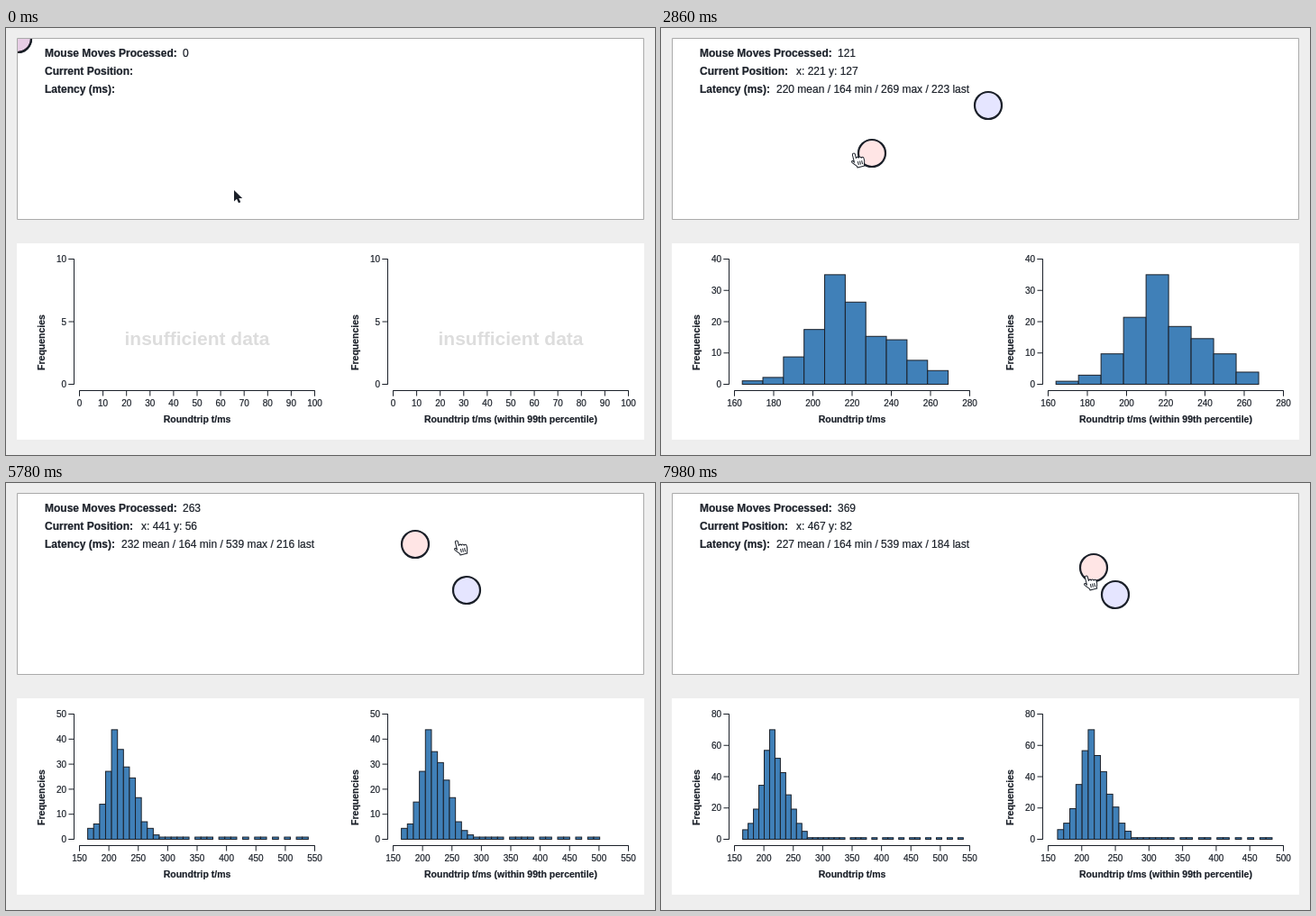
Animation, 720 px wide and 474 px high, one loop 8000 ms. Source, as an HTML page:

```html
<!DOCTYPE html>
<html lang="en">
<head>
<meta charset="utf-8">
<title>Mouse latency</title>
<style>
  html, body { margin: 0; width: 100%; height: 100%; overflow: hidden; background: #eee; }
  svg { display: block; width: 720px; height: 474px; font-family: "Liberation Sans", Arial, sans-serif; font-size: 12px; fill: #1b2029; }
  text { stroke: #1b2029; stroke-width: .2; }
  .axis { fill: none; stroke: #1b2029; }
  .tick { font-size: 10px; }
  .name { font-size: 10.5px; font-weight: bold; text-anchor: middle; }
  .none { font-size: 21px; font-weight: bold; text-anchor: middle; fill: #ddd; stroke: none; }
  .bar { fill: #4080b8; stroke: #1b2029; }
  .dot { stroke: #1b2029; stroke-width: 2.2; }
</style>
</head>
<body>
<svg viewBox="0 0 720 474">
  <defs><clipPath id="pad"><path d="M13 12H707V212H13Z"/></clipPath></defs>
  <path d="M12.5 11.5H707.5V212.5H12.5Z" fill="#fff" stroke="#aaa"/>
  <path d="M12 239H708V457H12Z" fill="#fff"/>
  <g font-weight="bold">
    <text x="43" y="32">Mouse Moves Processed:</text>
    <text x="43" y="52">Current Position:</text>
    <text x="43" y="72">Latency (ms):</text>
  </g>
  <text id="moves" x="196" y="32"></text>
  <text id="pos" x="150" y="52"></text>
  <text id="lat" x="128" y="72"></text>
  <g clip-path="url(#pad)">
    <circle id="blue" class="dot" r="15" fill="rgba(0,0,255,.1)"/>
    <circle id="red" class="dot" r="15" fill="rgba(255,0,0,.1)"/>
  </g>
  <g id="charts"></g>
  <g id="arrow"><path d="M0 0V12.5L3 9.8L5 14.3L7.3 13.3L5.3 9H9.2Z" stroke="#fff" stroke-width="1.6" paint-order="stroke"/></g>
  <g id="hand"><g transform="rotate(-14)" stroke="#1b2029" stroke-linejoin="round">
    <path fill="#fff" d="M-2 10V1.5Q-2 0-.5 0T1 1.5V6Q1.3 4.8 2.5 4.9T3.8 6.3Q4.3 5.3 5.4 5.5T6.6 7Q7.2 6.2 8.3 6.5T9.3 8V11Q9 13 8 14.5V16.5H0V15L-4.5 9.5Q-5 8-3.8 7.8T-2 10Z"/>
    <path d="M2 10v4M4.2 10v4M6.4 10v4"/>
  </g></g>
</svg>
<script>
const LOOP = 8000, STEP = 20, START = 120;
const FIRST = 368, RATE = .0486;
const RED_LAG = 200, BLUE_LAG = 420;
const $ = id => document.getElementById(id);
const clamp = (v, a, b) => Math.min(b, Math.max(a, v));
const mix = (a, b, u) => a + (b - a) * u;

// Pointer sweeps: end time, then where it is two lags before, one lag before, and at the end
const sweeps = [
  [1400, [319, 124], [306, 109], [287, 120]],
  [2860, [363, 86], [234, 139], [214, 139]],
  [4000, [429, 106], [405, 108], [458, 101]],
  [5780, [511, 119], [454, 68], [500, 64]],
  [7160, [423, 155], [284, 166], [235, 168]],
  [7980, [504, 124], [480, 94], [472, 103]]
];
const path = [{ t: START, at: [253, 180] }].concat(sweeps.flatMap(([t, a, b, c]) => [
  { t: t - BLUE_LAG, at: a }, { t: t - RED_LAG, at: b }, { t, at: c }
]));

// Velocity at a key point, led by the shorter neighbouring stretch
function slope(j, c) {
  const p = path[j - 1], q = path[j], r = path[j + 1];
  if (!p || !r) return 0;
  const h = q.t - p.t, k = r.t - q.t;
  return ((q.at[c] - p.at[c]) / h * k + (r.at[c] - q.at[c]) / k * h) / (h + k);
}

function pointer(t) {
  let i = 0;
  while (i < path.length - 2 && t >= path[i + 1].t) i++;
  const a = path[i], b = path[i + 1], h = b.t - a.t;
  const u = clamp((t - a.t) / h, 0, 1), w = 1 - u;
  return [0, 1].map(c =>
    w * w * (1 + 2 * u) * a.at[c] + u * u * (3 - 2 * u) * b.at[c] +
    h * u * w * (w * slope(i, c) - u * slope(i + 1, c)));
}

// Phases of the connection: last move, centre, spread, tail power
const phases = [[55, 228, 14.3, .8], [121, 213, 7.7, 1.25], [243, 220, 17, .8], [Infinity, 214, 11, 1]];
const STALL = 213, QUEUE = 20;

function latency(i) {
  const late = i - STALL;
  if (late >= 0 && late < QUEUE) return 539 - 19.5 * late + .3 * late * late;
  const [, mid, spread, power] = phases.find(p => i <= p[0]);
  const u = mix(.007, .993, i * .618034 % 1);
  const z = Math.log(u / (1 - u));
  return clamp(mid + spread * Math.sign(z) * Math.abs(z) ** power, 164, 269);
}
const latencies = Array.from({ length: 400 }, (_, i) => latency(i + 1));

function niceScale(lo, hi, count) {
  const span = hi - lo;
  let step = 10 ** Math.floor(Math.log10(span / count));
  const err = count / span * step;
  step *= err <= .15 ? 10 : err <= .35 ? 5 : err <= .75 ? 2 : 1;
  return { lo: Math.floor(lo / step) * step, hi: Math.ceil(hi / step) * step, step };
}

function histogram(sorted) {
  const n = sorted.length, lo = sorted[0], hi = sorted[n - 1];
  const bins = Math.ceil((hi - lo) * Math.cbrt(n) / Math.min(66, 50 + n / 17));
  const size = (hi - lo) / bins, counts = Array(bins).fill(0);
  for (const v of sorted) counts[Math.min(bins - 1, Math.floor((v - lo) / size))]++;
  return { lo, hi, size, counts };
}

const LEFT = 81.5, WIDE = 261, BASE = 395.5, TALL = 139;

function axes(xs, ys) {
  let line = `M69.5 ${BASE - TALL}H75.5V${BASE}H69.5M${LEFT} 408.5V402.5H${LEFT + WIDE}V408.5`, text = "";
  for (let v = xs.lo; v <= xs.hi; v += xs.step) {
    const x = LEFT + WIDE * (v - xs.lo) / (xs.hi - xs.lo);
    line += `M${x} 402.5v6`;
    text += `<text class="tick" text-anchor="middle" x="${x}" y="419.5">${v}</text>`;
  }
  for (let v = 0; v <= ys.hi; v += ys.step) {
    const y = BASE - TALL * v / ys.hi;
    line += `M69.5 ${y}h6`;
    text += `<text class="tick" text-anchor="end" x="67" y="${y + 3.7}">${v}</text>`;
  }
  return `<path class="axis" d="${line}"/>${text}`;
}

function drawChart(x, label, sorted) {
  let xs = { lo: 0, hi: 100, step: 10 }, ys = { hi: 10, step: 5 }, body = "";
  if (sorted.length < 10) {
    body = `<text class="none" x="212" y="352">insufficient data</text>`;
  } else {
    const { lo, hi, size, counts } = histogram(sorted);
    const top = Math.max(...counts);
    xs = niceScale(lo, hi, 7);
    ys = niceScale(0, top, 4);
    const px = WIDE / (xs.hi - xs.lo);
    counts.forEach((c, i) => {
      if (!c) return;
      const h = .875 * TALL * c / top;
      body += `<rect class="bar" x="${LEFT + (lo - xs.lo + i * size) * px}" y="${BASE - h}" width="${size * px}" height="${h}"/>`;
    });
  }
  return `<g transform="translate(${x})">${body}${axes(xs, ys)}
    <text class="name" x="212" y="437.5">${label}</text>
    <text class="name" transform="translate(43 349) rotate(-90)">Frequencies</text></g>`;
}

function report(n) {
  const seen = latencies.slice(0, n), sorted = [...seen].sort((a, b) => a - b);
  const mean = seen.reduce((a, b) => a + b, 0) / n;
  const [avg, min, max, last] = [mean, sorted[0], sorted[n - 1], seen[n - 1]].map(Math.round);
  $("moves").textContent = n;
  $("lat").textContent = n ? `${avg} mean / ${min} min / ${max} max / ${last} last` : "";
  $("charts").innerHTML =
    drawChart(0, "Roundtrip t/ms", sorted) +
    drawChart(348, "Roundtrip t/ms (within 99th percentile)", sorted.slice(0, n - Math.floor(n / 100)));
}

function place(id, [x, y], visible = true) {
  $(id).setAttribute("transform", `translate(${x} ${y})`);
  $(id).style.display = visible ? "" : "none";
}

let shown = -1;
function draw(t) {
  const n = Math.max(0, Math.floor((t - FIRST) * RATE));
  const follow = lag => n && t > START + lag ? pointer(t - lag).map(Math.round) : [13, 12];
  const red = follow(RED_LAG), at = pointer(t), moving = t >= START;
  place("red", red);
  place("blue", follow(BLUE_LAG));
  place("hand", at, moving);
  place("arrow", at, !moving);
  $("pos").textContent = n ? `x: ${red[0] - 13} y: ${red[1] - 12}` : "";
  if (n !== shown) report(n);
  shown = n;
}

const begin = performance.now();
function tick() {
  const t = (performance.now() - begin) % LOOP;
  draw(Math.floor(t / STEP) * STEP);
  requestAnimationFrame(tick);
}
tick();
</script>
</body>
</html>
```
